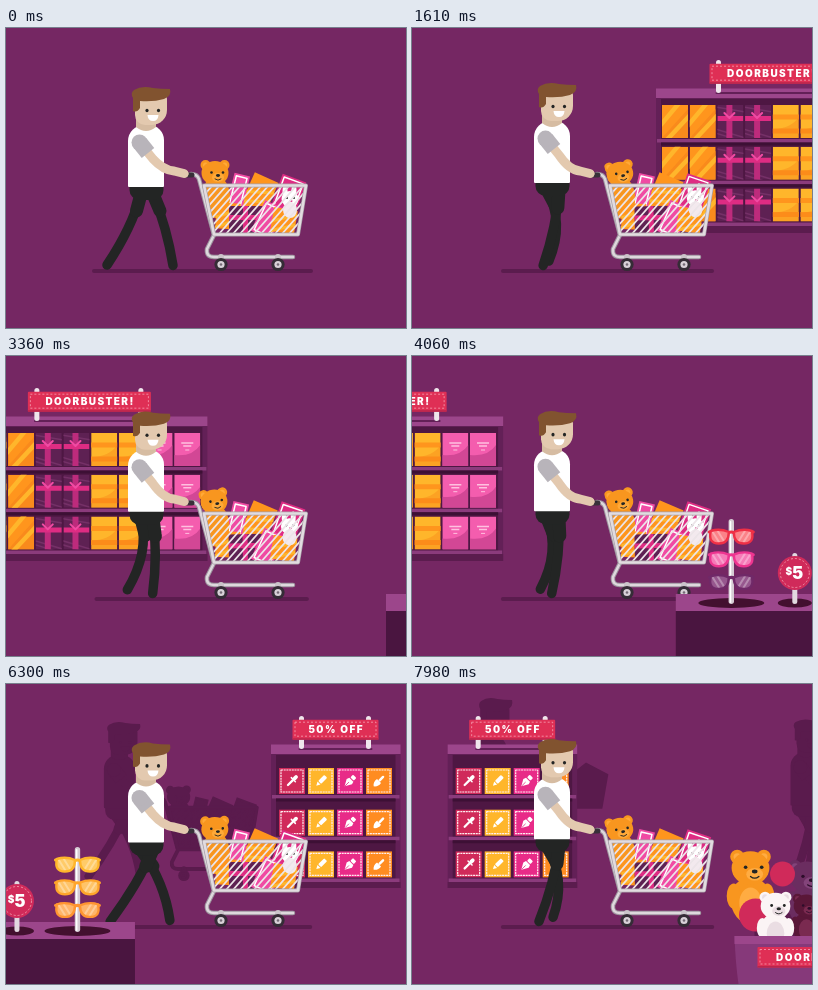
Animation of 400 by 300 pixels, one loop 8000 ms. Source, as an HTML page with a canvas:

```html
<!DOCTYPE html>
<html lang="en">
<head>
<meta charset="utf-8">
<title>Shopping walk</title>
<style>
html, body { margin: 0; width: 100%; height: 100%; overflow: hidden; background: #752763; }
canvas { display: block; width: 100vw; height: 100vh; }
</style>
</head>
<body>
<canvas id="stage" width="400" height="300"></canvas>
<script>
const ctx = document.getElementById('stage').getContext('2d');
const LOOP = 8000, TICK = 70, STEP = 633;
const C = {
  wall: '#752763', shade: '#5b1c4e', ghost: '#5a1b4d', deep: '#4e1743', frame: '#9c468b',
  board: '#8b3b7c', side: '#632057', red: '#df2f55', crimson: '#d02a5a', pink: '#f04aa3',
  magenta: '#de2c83', orange: '#ff951d', yellow: '#ffb62b', plum: '#5e2153', white: '#ffffff',
  steel: '#cbc4ca', ink: '#232524', skin: '#e3c9af', hair: '#81532f', bear: '#f8961f'
};
let tint = null; // when set, everything is drawn in this one colour

function paint(color) { ctx.fillStyle = ctx.strokeStyle = tint || color; }
function rect(x, y, w, h, color, r = 0) {
  paint(color);
  ctx.beginPath();
  ctx.roundRect(x, y, w, h, r);
  ctx.fill();
}
function oval(x, y, rx, color, ry = rx) {
  paint(color);
  ctx.beginPath();
  ctx.ellipse(x, y, rx, ry, 0, 0, 7);
  ctx.fill();
}
function shape(d, color) { paint(color); ctx.fill(new Path2D(d)); }
function line(d, color, width, cap = 'round') {
  paint(color);
  ctx.lineWidth = width;
  ctx.lineCap = cap;
  ctx.lineJoin = 'round';
  ctx.stroke(new Path2D(d));
}
function at(x, y, draw, degrees = 0, sx = 1, sy = sx) {
  ctx.save();
  ctx.translate(x, y);
  ctx.rotate(degrees * Math.PI / 180);
  ctx.scale(sx, sy);
  draw();
  ctx.restore();
}
function clipped(d, draw) {
  ctx.save();
  ctx.clip(new Path2D(d));
  draw();
  ctx.restore();
}
function text(label, x, y, size, spacing = 0) {
  paint(C.white);
  ctx.font = `900 ${size}px Inter, sans-serif`;
  ctx.letterSpacing = spacing + 'px';
  ctx.textAlign = 'center';
  ctx.textBaseline = 'alphabetic';
  ctx.fillText(label, x + spacing / 2, y);
}
function dashes(draw, color, pattern = [2, 2], width = 0.8) {
  paint(color);
  ctx.lineWidth = width;
  ctx.lineCap = 'butt';
  ctx.setLineDash(pattern);
  draw();
  ctx.setLineDash([]);
}

// Shop fittings
function banner(x, y, w, h, label) {
  rect(x, y, w, h, C.red, 1);
  rect(x, y + h - 1.5, w, 1.5, '#b9264c');
  dashes(() => ctx.strokeRect(x + 2.5, y + 2.5, w - 5, h - 6), '#f9a3b4');
  text(label, x + w / 2, y + h / 2 + 3.4, 10, 1.45);
}
function hangingSign(x, w, label) {
  rect(x + 6, 64, w - 12, 2, C.side, 1);
  for (const px of [x + 9, x + w - 10]) rect(px - 2.5, 32, 5, 33, '#efe6ec', 2.5);
  banner(x, 35.7, w, 20, label);
}
function shelf(w, bottom, fillRow) {
  rect(0, 70, w, bottom - 70, C.side);
  rect(5, 71, w - 10, bottom - 78, C.deep);
  rect(0, 60.5, w, 9.5, C.frame);
  for (let row = 0; row < 3; row++) {
    fillRow(row);
    const y = 111 + row * 41.7;
    rect(1, y, w - 2, 3.5, C.board);
    rect(5, y + 3.5, w - 10, 3, '#3d1035');
  }
  rect(0, 198, w, bottom - 198, C.shade);
}
function giftBox(kind, w, h) {
  clipped(`M0 0H${w}V${h}H0Z`, () => {
    if (kind === 0) {
      rect(0, 0, w, h, C.orange);
      shape(`M${w} 4V${h}H0Z`, '#f98a1c');
      line('M-3 22L18 -3M2 38L30 8', C.yellow, 4.5);
    } else if (kind === 1) {
      rect(0, 0, w, h, C.plum);
      line('M-2 24L28 33M-2 28L28 37M-2 2L28 7', '#753067', 1.5);
      rect(9, 0, 6, h, '#bd2b7c');
      rect(0, 11, w, 5, C.magenta);
      line('M12 13L7 8M12 13L17 8', C.pink, 2);
    } else if (kind === 2) {
      rect(0, 0, w, h, C.yellow);
      line('M-2 12H29M-2 26H29', C.orange, 5);
      shape('M0 24Q18 24 26 12V33H0Z', 'rgba(245,125,20,.35)');
    } else {
      rect(0, 0, w, h, '#f45dae');
      shape('M0 22Q18 24 26 12V33H0Z', '#d24795');
      line('M7 10H19M9 13H17', '#ffc0df', 1.5, 'butt');
      line('M11 17H15', '#ffc0df', 1, 'butt');
    }
  });
}
function giftShelf() {
  shelf(233, 205, row => {
    for (let i = 0; i < 8; i++)
      at(6 + i * 27.7, 77 + row * 41.7, () => giftBox(i >> 1, 26, 33));
  });
  hangingSign(53.5, 123, 'DOORBUSTER!');
}
const toolIcons = [
  () => { line('M0 -6V-4', C.white, 4); line('M-3 -2H3', C.white, 1.6); line('M0 -1V6', C.white, 2.4); },
  () => { rect(-2.2, -7, 4.4, 9, C.white, 1); shape('M-2.2 3H2.2L0 7Z', C.white); },
  () => { rect(-2.5, -7, 5, 4, C.white, 1); shape('M-3 -2H3L4 1L0 8L-4 1Z', C.white); line('M0 2V7', C.magenta, 0.8); },
  () => { line('M0 -6V-1', C.white, 2.6); shape('M-3 0H3Q4 5 0 8Q-4 5 -3 0Z', C.white); }
];
function toolShelf() {
  const colors = [C.crimson, C.yellow, '#e82b88', '#ff8c21'];
  shelf(129.5, 204, row => {
    colors.forEach((color, i) => at(8 + i * 29, 84 + row * 41.7, () => {
      rect(0, 0, 26, 26, color);
      dashes(() => ctx.strokeRect(2, 2, 22, 22), '#ffeef0', [2, 0.7], 1.2);
      at(13, 13, toolIcons[i], 45, 0.95);
    }));
  });
  hangingSign(21.5, 86, '50% OFF');
}
function glasses(y, color, lens) {
  const rim = 'M-9 -4Q0 -8 9 -5Q12 7.5 1 7.5Q-9 7.5 -9 -4Z';
  at(0, y, () => {
    line('M-22 -4Q-12 -7 -3 -3Q0 -5 3 -3Q12 -7 22 -4', color, 3);
    for (const side of [-1, 1]) at(side * 11.5, 0, () => {
      shape(rim, lens);
      clipped(rim, () => line('M-6 8L4 -8M-1 9L9 -7', 'rgba(255,255,255,.3)', 2));
      line(rim, color, 2.4);
    }, 0, side, 1);
  });
}
function glassesStand(x, pairs) {
  at(x, 0, () => {
    oval(0, 247, 33, '#43102f', 5);
    rect(-2.7, 163, 5.4, 85, '#d5cbd3', 2.7);
    rect(-1.6, 165, 1.6, 82, C.white, 1);
    pairs.forEach(([color, lens], i) => glasses(180 + i * 22.7, color, lens));
  });
}
function podium() {
  rect(-55.5, 238, 237, 17, C.frame);
  rect(-55.5, 255, 237, 45, '#4a1540');
  glassesStand(0, [['#ef3046', '#fb8288'], ['#ee3590', '#f67bb8'], ['#702968', '#96578e']]);
  glassesStand(124, [['#ffb62b', '#ffcb68'], ['#ffa52a', '#ffc468'], ['#ff9531', '#ffb56a']]);
  at(63.5, 0, () => {
    oval(0, 247, 17, '#43102f', 4.5);
    rect(-2.5, 197, 5, 51, '#e2d9e0', 2.5);
    oval(0, 217, 17, C.crimson);
    dashes(() => { ctx.beginPath(); ctx.arc(0, 217, 14.5, 0, 7); ctx.stroke(); }, '#f5a7b7');
    text('$', -6, 219, 10);
    text('5', 3, 223, 17);
  });
}

// Toys
function bearHead(color, muzzle, eye = C.ink) {
  for (const side of [-1, 1]) {
    oval(side * 9.5, -8, 5, color);
    oval(side * 9.5, -8, 2.6, muzzle);
  }
  oval(0, 0, 13.5, color, 12);
  oval(3, 4.5, 6, muzzle, 4.5);
  oval(-3.5, -0.5, 1.3, eye);
  oval(8, -0.5, 1.3, eye);
  oval(3, 2.5, 2, eye, 1.4);
  line('M0 6Q3 8.5 6 6', eye, 0.9);
}
function bear(x, y, size, color, muzzle, eye) {
  at(x, y, () => {
    oval(0, 23, 14, color, 17);
    oval(-12, 20, 5, color, 9);
    oval(12, 20, 5, color, 9);
    oval(0, 25, 8, muzzle, 11);
    bearHead(color, muzzle, eye);
  }, 0, size);
}
function toyBin() {
  rect(20, 212, 160, 60, C.shade);
  bear(73, 193, 1.3, '#6b2d60', '#83447a', '#2d0d2a');
  oval(48, 190, 12.5, C.crimson);
  bear(16, 184, 1.4, C.bear, '#ffac42');
  bear(92, 224, 1.1, C.bear, '#ffac42');
  bear(72, 222, 0.95, '#5a1738', '#7a2a50', '#2d0d2a');
  oval(21, 231, 16.5, C.crimson);
  bear(41, 222, 1.1, '#fbf4f5', '#eadde3');
  shape('M0 252H140V300H4Q1 280 0 252Z', '#86397a');
  rect(0, 252, 140, 8, C.frame);
  banner(23, 263, 125, 20.5, 'DOORBUSTER!');
}

// Shopper
function card(x, y, w, h, degrees, color, trim) {
  at(x, y, () => {
    rect(-w / 2, -h / 2, w, h, color);
    if (trim) trim(w, h);
  }, degrees);
}
function cart(lift) {
  const basket = 'M198 157.5H300L292 206.5H208Z';
  const tube = 'M185 146Q191 146 193 151L208 207L201 221Q200 229 208 229H287';
  const stripes = (w, h) => line(`M${-w / 2} 2L${w / 2} -8M${-w / 2} 12L${w / 2} 2`, C.yellow, 3, 'butt');
  const border = (w, h) => { paint(C.white); ctx.lineWidth = 1.5; ctx.strokeRect(2.5 - w / 2, 2.5 - h / 2, w - 5, h - 5); };
  if (tint) shape(basket, tint);
  clipped('M185 110H315V157L300 158L292 207H208L197 157Z', () => {
    at(245, 206, () => {
      ctx.translate(-245, -206);
      card(253, 167, 26, 38, 24, C.orange, stripes);
      card(282, 168, 25, 38, 20, C.magenta, border);
      card(231, 168, 16, 44, 14, C.pink, border);
      oval(210, 169, 14, C.bear, 21);
      at(209, 145, () => bearHead(C.bear, '#ffa938'), -9 * lift);
      card(222, 188, 24, 26, 4, C.orange, stripes);
      card(240, 192, 34, 28, 0, C.plum, (w, h) => {
        rect(-w / 2, -5, w, 5, C.magenta);
        rect(-3, -h / 2, 5, h, C.magenta);
      });
      card(262, 192, 22, 34, 25, C.pink, border);
      card(278, 193, 24, 24, 10, C.orange, stripes);
      oval(279, 163, 2.5, C.white, 6);
      oval(288, 162, 2.5, C.white, 6);
      oval(284, 171, 8.5, C.white, 8);
      oval(284, 182, 7, '#f3e9ee', 8);
      oval(281, 170, 1, C.ink);
      oval(288, 170, 1, C.ink);
      oval(285, 173, 1.5, C.magenta, 1);
    }, -1.2 * lift);
  });
  clipped(basket, () => {
    for (let x = 200; x < 350; x += 7) line(`M${x} 157L${x - 44} 207`, '#ece4e8', 1.8);
  });
  line(tube, '#9d949e', 4.5);
  line(tube, '#ded8dd', 2.5);
  line(basket, '#a79fa8', 4);
  line(basket, '#e2dce0', 2.6);
  line('M178 147L186 147', '#383039', 5);
  for (const x of [215, 272]) {
    line(`M${x} 229V234`, C.steel, 6);
    oval(x, 236.5, 6.6, '#352c36');
    oval(x, 236.5, 3.6, '#d9d1d8');
    oval(x, 236.5, 1.3, '#756b76');
  }
}
function leg(hipX, hipY, footX, footY, bend) {
  const kneeX = (hipX + footX) / 2 + bend, kneeY = (hipY + footY) / 2 - 2;
  line(`M${hipX} ${hipY}Q${kneeX} ${kneeY} ${footX} ${footY}`, C.ink, 9.5);
  line(`M${hipX} ${hipY}L${(hipX + kneeX) / 2} ${(hipY + kneeY) / 2}`, C.ink, 13);
}
function man(phase, lift) {
  const rise = 4 * lift, hipY = 166 - rise;
  leg(135, hipY, 101 + 66 * phase, 237 - 4 * lift, 8 + 9 * lift);
  leg(147, hipY, 167 - 66 * phase, 237.5, 4 + 3 * phase);
  rect(123.5, 150 - rise, 34, 22, C.ink, [0, 0, 10, 10]);
  at(0, -rise, () => {
    rect(122, 97, 36, 62, C.white, [16, 15, 1, 1]);
    shape('M130 82H150V99Q140 107 130 99Z', '#d6bca2');
    rect(129, 65, 32, 32, C.skin, [6, 6, 15, 10]);
    shape('M127 83V70Q124 65 128 62Q136 57 147 60Q154 61 164 61Q166 68 158 71Q148 74 134 73V80Q131 85 127 83Z', C.hair);
    oval(141, 82.5, 1.6, C.ink, 1.8);
    oval(152.5, 82.5, 1.6, C.ink, 1.8);
    shape('M141.5 87H152.5Q152 93 147 93Q142 93 141.5 87Z', C.white);
  });
  const y = 115 - rise;
  line(`M134 ${y}L147 ${y + 16}Q157 142 168 143L178 145.5`, C.skin, 9);
  line(`M134 ${y}L142 ${y + 10}`, '#b8b4ba', 16, 'butt');
  oval(133.5, y - 0.5, 8, '#b8b4ba');
  line('M174 144.5L179 146', C.skin, 7);
}

function render(t) {
  const phase = t / STEP % 1, lift = Math.sin(Math.PI * phase);
  const layer = (x, when, speed, draw) => at(x - (t - when) * speed, 0, draw);
  rect(0, 0, 400, 300, C.wall);

  tint = C.ghost;
  at(-7 + (t - 6300) * 0.167, -12, () => { cart(lift); man(phase, lift); }, 0, 0.86);
  at(-41 + (t - 7980) * 0.167, -40, () => {
    man(phase, lift);
    shape('M225 138L250 121L276 133L269 168H225Z', C.ghost);
  }, 0, 0.86, 0.98);
  tint = null;

  layer(244, 1610, 0.1575, giftShelf);
  layer(265, 6300, 0.1365, toolShelf);

  line(`M${88 + 3 * lift} 243H${305 - 5 * lift}`, C.shade, 4);
  cart(lift);
  man(phase, lift);

  layer(145, 5110, 0.166, podium);
  layer(322.5, 7980, 0.166, toyBin);
}

const start = performance.now();
function frame() {
  const t = (performance.now() - start) % LOOP;
  render(Math.floor(t / TICK) * TICK);
  requestAnimationFrame(frame);
}
frame();
</script>
</body>
</html>
```
